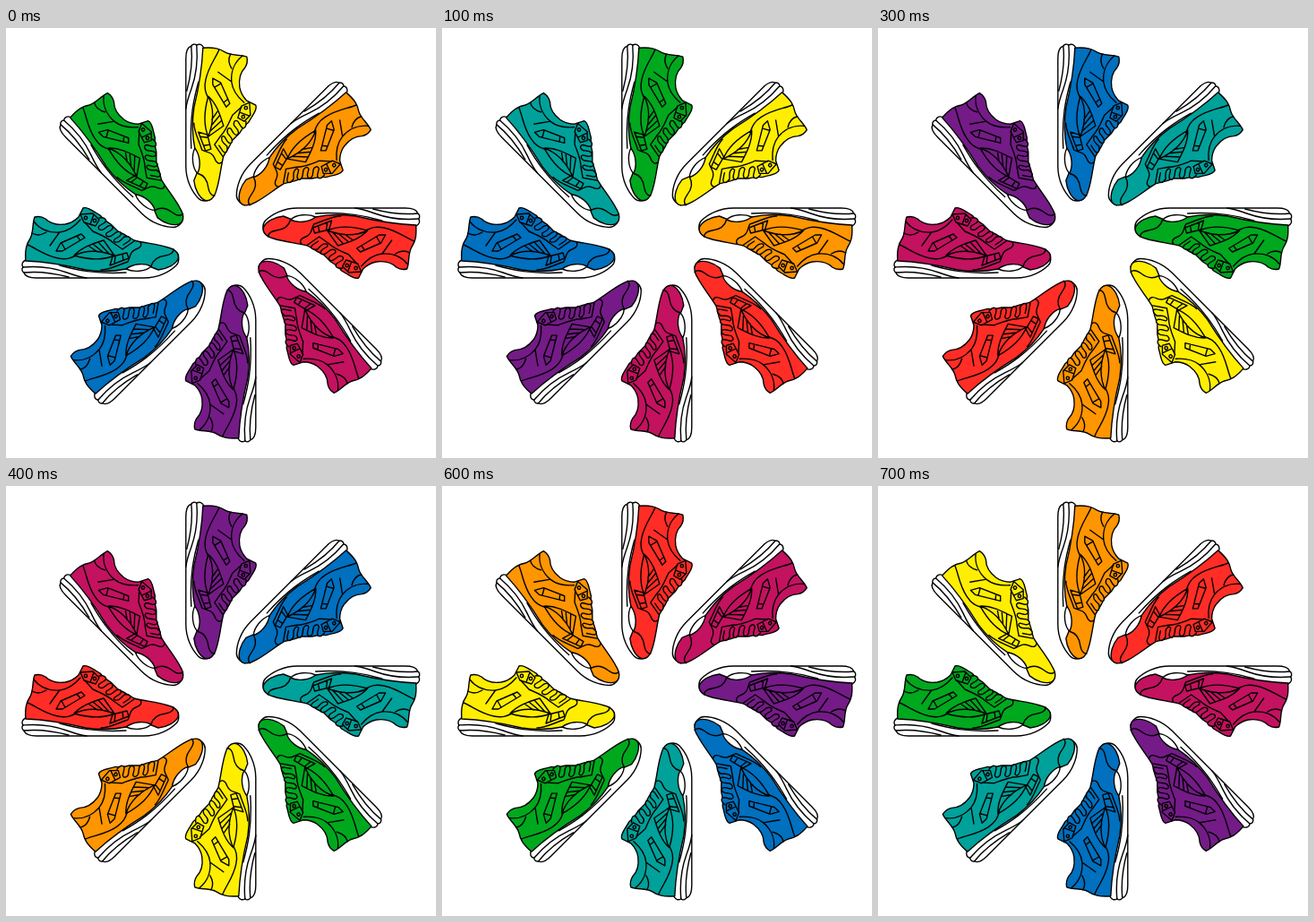
An HTML page that plays this animation: 480x480 px, repeating every 0.8 s.

```html
<!DOCTYPE html>
<html lang="en">
<head>
<meta charset="utf-8">
<title>Colour wheel of sneakers</title>
<style>
html, body { margin: 0; width: 100%; height: 100%; overflow: hidden; background: #fff; }
svg { display: block; width: 100vw; height: 100vh; }
</style>
</head>
<body>
<svg viewBox="0 0 480 480">
  <defs>
    <g id="shoe" stroke="#000" stroke-width="1.4" stroke-linejoin="round" stroke-linecap="round" fill="none">
      <!-- sole -->
      <path fill="#fff" d="M22 259C18 261 17 264 19 267C17 269 18 272 20 273C21 277 26 279 34 279H154C170 279 183 272 190 265C194 261 193 254 191 251L100 255Z"/>
      <!-- upper -->
      <path fill="currentColor" d="M22 260C21 247 23 241 27 235C31 228 29 219 32 211C36 210 41 211 44 213C50 219 58 220 66 219C72 218 77 215 81 211L86 201C90 199 95 203 100 206L105 209C108 213 112 216 117 219L125 227L133 231L143 237C154 240 169 241 181 245C189 247 194 252 192 258C189 264 180 269 170 270L160 266C152 263 143 264 134 269C120 272 103 272 89 270C68 265 46 261 22 260Z"/>
      <!-- sole layers and toe lens -->
      <path d="M19 267C42 265 57 269 68 273S82 278 90 279M20 273C39 271 55 274 70 278M60 265C78 270 100 275 134 273"/>
      <path fill="#fff" d="M134 269C142 263 154 262 162 266C156 272 142 273 134 269Z"/>
      <!-- heel and collar -->
      <path d="M31 216C38 225 49 229 60 228C69 227 77 221 83 214M29 229C34 232 40 231 45 228M24 242C34 246 43 254 58 257C67 259 72 257 78 254M49 243L59 229"/>
      <!-- side windows -->
      <path d="M56 249L61 240L84 230L88 234L63 249ZM62 240L66 247M79 232L83 237"/>
      <path d="M76 254C84 245 96 241 109 237L121 254C107 260 90 258 76 254ZM76 254C90 247 105 248 121 254M92 243L102 250M97 241L108 250M103 239L115 252"/>
      <path d="M116 265L119 255L135 251L137 257ZM122 255L121 263M130 253L131 259"/>
      <!-- eyestay and toe cap -->
      <path d="M88 217L97 227C106 231 114 234 120 240L130 247L143 238M106 270C115 270 124 265 136 261C139 255 138 250 145 247C151 245 152 242 150 239M162 266C164 258 170 255 178 254C184 253 187 250 187 247"/>
      <!-- eyelets -->
      <path d="M83 208L97 207L104 214L100 221L87 217ZM98 208L94 219"/>
      <circle cx="89" cy="212" r="1.7"/><circle cx="99" cy="215" r="1.7"/>
      <!-- laces -->
      <path fill="currentColor" d="M104 212C111 211 114 215 109 218L104 221C101 225 107 227 110 224L114 221C119 219 121 223 117 226L112 229C110 233 116 234 119 231L123 228C129 226 130 230 126 233L121 236C119 240 125 240 128 237L132 233C138 232 141 235 137 238L131 242"/>
    </g>
  </defs>
</svg>
<script>
const colors = ["#00a19a", "#00a81e", "#ffee00", "#ff9500", "#ff2d25", "#c3125f", "#741b87", "#0070bf"];
const svg = document.querySelector("svg");
const shoes = colors.map((_, i) => {
  const shoe = document.createElementNS(svg.namespaceURI, "use");
  shoe.setAttribute("href", "#shoe");
  shoe.setAttribute("transform", `rotate(${i * 45} 239.8 240)`);
  return svg.appendChild(shoe);
});

// Every 100 ms each colour moves one shoe clockwise.
function draw(now) {
  const step = Math.floor(now / 100) % 8;
  shoes.forEach((shoe, i) => { shoe.style.color = colors[(i - step + 8) % 8]; });
}

const start = performance.now();
function tick() {
  draw(performance.now() - start);
  requestAnimationFrame(tick);
}
tick();
</script>
</body>
</html>
```
